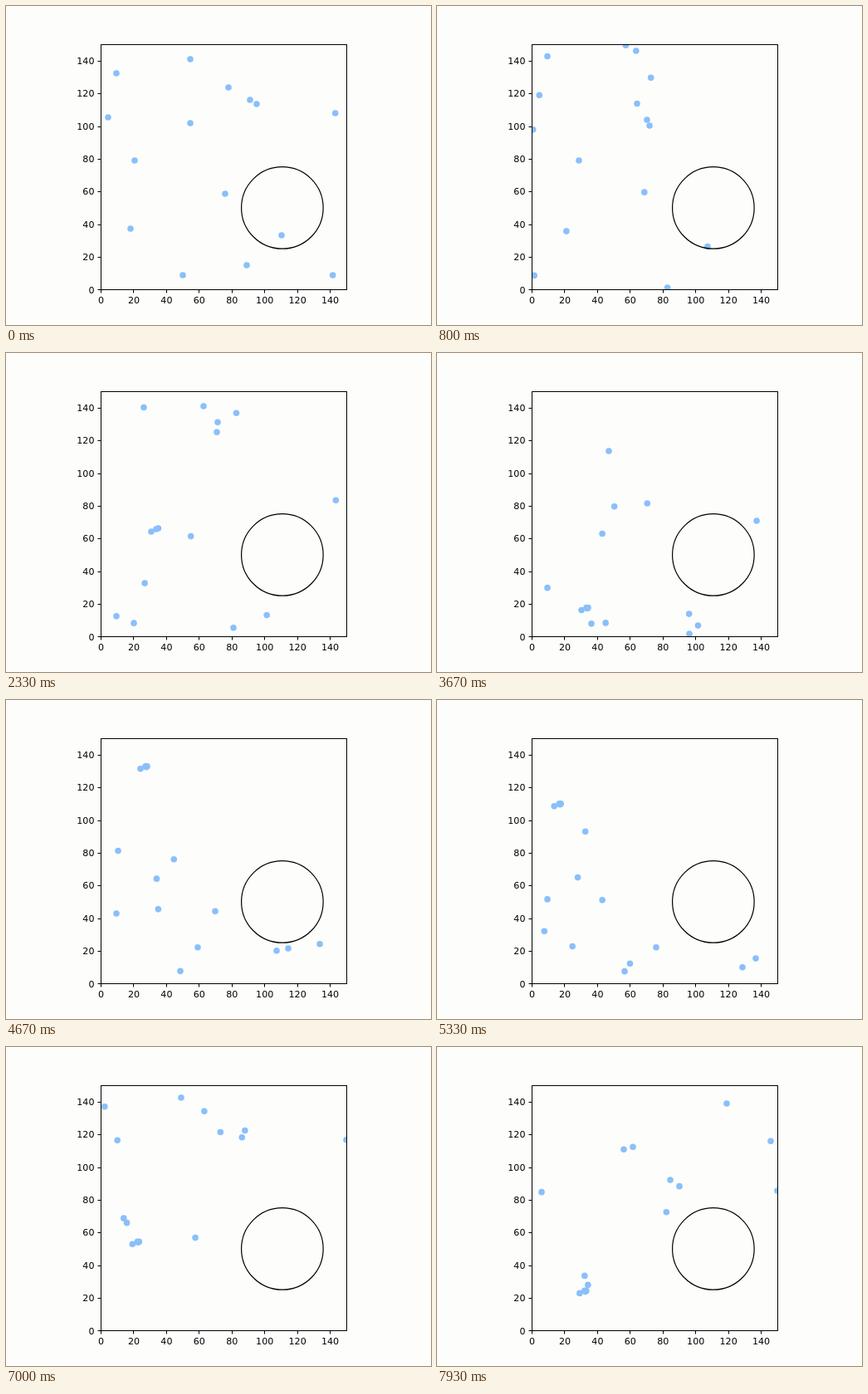
Write an HTML page with a canvas that moves like this. It is 512x384 px and loops after 8000 ms.

```html
<!DOCTYPE html>
<html>
<head>
<meta charset="utf-8">
<style>
html, body { margin: 0; width: 100%; height: 100%; overflow: hidden; background: #fdfdfc; }
canvas { display: block; }
</style>
</head>
<body>
<canvas id="stage" width="512" height="384"></canvas>
<script>
const ctx = document.getElementById('stage').getContext('2d');
const LEFT = 114.56, TOP = 46.08, SIZE = 295.68, BOTTOM = TOP + SIZE;
const UNIT = SIZE / 150;
const STEPS = 120, STEP_MS = 8000 / STEPS;

// Positions run on past the edges and are wrapped when drawn.
const mix = (a, b, k) => a + (b - a) * k;
const wrap = (value, start) => start + (((value - start) % SIZE) + SIZE) % SIZE;

// The flock falls at a slowly fading speed and swerves left once.
function flockAt(step) {
  const u = step - 35;
  return [180 - 46.5 * Math.exp(-(((step - 90) / 17.7) ** 2)), 213 + u * (4.8 - 0.0037 * u)];
}

// Flies straight, then eases into its place in the flock between two steps.
function joiner([x, y], [vx, vy], [from, to], [dx, dy]) {
  return step => {
    const t = Math.min(1, Math.max(0, (step - from) / (to - from)));
    const k = t * t * (3 - 2 * t);
    const [fx, fy] = flockAt(step);
    return [mix(x + vx * step, fx + dx, k), mix(y + vy * step, fy + dy, k)];
  };
}

// Flies straight between a few turning points [step, x, y].
function stray(...turns) {
  return step => {
    const next = turns.findIndex(turn => turn[0] >= step) || 1;
    const [s0, x0, y0] = turns[next - 1], [s1, x1, y1] = turns[next];
    const k = (step - s0) / (s1 - s0);
    return [mix(x0, x1, k), mix(y0, y1, k)];
  };
}

const birds = [
  joiner([294, 113], [-3.42, 2], [12, 35], [-5, 2]),
  joiner([302, 118], [-3.83, 2.17], [12, 35], [1, -1]),
  joiner([155, 186], [1.33, 0], [20, 38], [2, 0]),
  joiner([150, 268], [0.49, 0.26], [46, 55], [3, -1]),
  joiner([133, 81 + 2 * SIZE], [0, -1.71], [97, 119], [5, -8]),
  joiner([264, 226 + SIZE], [-1.18, -0.155], [97, 119], [1, -19]),

  // Turned away by the round obstacle
  stray([0, 222, 64], [70, 326, 6], [90, 410, 46.2], [119, 410, 173]),
  stray([0, 123, 134], [59, 87, 207], [119, 349, 68]),
  stray([0, 222, 141], [53, 306, 37], [70, 378, -2], [90, 472, -33], [119, 572, -97]),
  stray([0, 332, 276], [55, 304, 338], [70, 340, 299], [90, 428, 323], [119, 402, 409]),

  // Loose group
  stray([0, 268, 98], [35, 238, 64], [55, 207, 118], [90, 196, 290], [119, 225, 419]),
  stray([0, 101, 129], [70, 231, 2], [90, 234, 41], [119, 281, 160]),
  stray([0, 213, 324], [35, 255, 379], [70, 252, 550], [90, 276, 637], [119, 292, 759]),
  stray([0, 290, 312], [35, 254, 391], [90, 143, 637], [119, 126, 766]),
  stray([0, 98, 324], [90, 242, 327], [119, 236, 416])
];

function disc(x, y, r) {
  ctx.beginPath();
  ctx.arc(x, y, r, 0, 2 * Math.PI);
}

function drawBirds(step) {
  ctx.save();
  ctx.beginPath();
  ctx.rect(LEFT, TOP, SIZE, SIZE);
  ctx.clip();
  ctx.fillStyle = '#8abffa';
  for (const positionAt of birds) {
    const [x, y] = positionAt(step);
    disc(wrap(x, LEFT), wrap(y, TOP), 3.8);
    ctx.fill();
  }
  ctx.restore();
}

function drawAxes() {
  ctx.strokeStyle = ctx.fillStyle = '#000';
  ctx.lineWidth = 1.2;
  disc(LEFT + 111 * UNIT - 0.5, BOTTOM - 50 * UNIT - 0.3, 25 * UNIT);
  ctx.stroke();

  ctx.lineWidth = 1;
  ctx.strokeRect(114.5, 46.5, 296, 295);
  ctx.font = '11.11px "DejaVu Sans", sans-serif';
  ctx.beginPath();
  for (let value = 0; value <= 140; value += 20) {
    const x = LEFT + value * UNIT, y = BOTTOM - value * UNIT;
    const tickX = Math.floor(x) + 0.5, tickY = Math.round(y) - 0.5 + (value > 0);
    ctx.moveTo(tickX, 341.5);
    ctx.lineTo(tickX, 345.5);
    ctx.moveTo(114.5, tickY);
    ctx.lineTo(110.5, tickY);
    ctx.textAlign = 'center';
    ctx.fillText(value, x, 358);
    ctx.textAlign = 'right';
    ctx.fillText(value, 106.5, Math.round(y + 4));
  }
  ctx.stroke();
}

function draw() {
  const step = Math.floor((performance.now() + 4) / STEP_MS) % STEPS;
  ctx.fillStyle = '#fdfdfc';
  ctx.fillRect(0, 0, 512, 384);
  drawBirds(step);
  drawAxes();
  requestAnimationFrame(draw);
}
draw();
</script>
</body>
</html>
```
